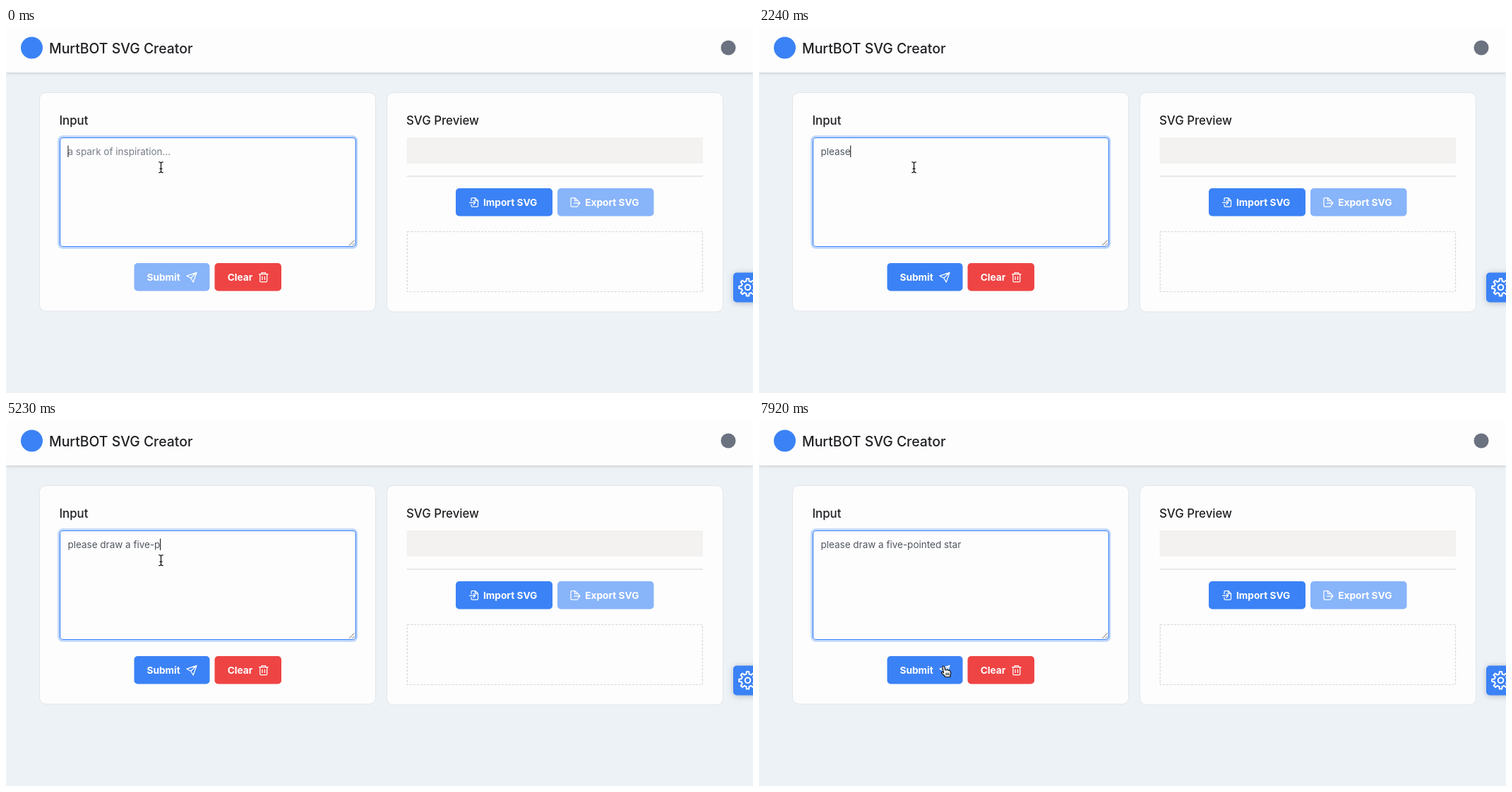
These frames come from a looping animation (1058x517 px, 8 s). An HTML page:

```html
<!DOCTYPE html>
<html lang="en">
<head>
<meta charset="utf-8">
<title>SVG Creator</title>
<style>
  html, body { margin: 0; width: 100%; height: 100%; overflow: hidden; background: #edf2f6; }
  svg { display: block; }
  text { font-family: Inter, sans-serif; font-size: 13.5px; white-space: pre; fill: #1f2124; }
  .title { font-size: 19.4px; font-weight: 500; }
  .heading { font-size: 16.8px; font-weight: 500; }
  .label { font-size: 13.7px; font-weight: 700; fill: #fff; }
  .card { fill: #fdfdfd; stroke: #e2e6eb; }
  .icon { fill: none; stroke: #fff; stroke-width: 1.25; stroke-linecap: round; stroke-linejoin: round; }
  .blue { fill: #3b82f6; }
  .pale { fill: #88b4fa; }
  .red { fill: #ef4444; }
  .bar { filter: drop-shadow(0 1px 2px rgba(0, 0, 0, .18)); }
  .tab { filter: drop-shadow(0 1px 4px rgba(40, 60, 90, .3)); }
</style>
</head>
<body>
<svg width="1058" height="517" viewBox="0 0 1058 517">
  <defs>
    <g id="file" class="icon">
      <path d="M2.5 5V2Q2.5 .7 3.8 .7H8L12 4.7V12Q12 13.3 10.7 13.3H3.8Q2.5 13.3 2.5 12V10M8 .7V4.7H12"/>
    </g>
  </defs>

  <rect class="bar" width="1058" height="63" fill="#fdfdfd"/>
  <circle class="blue" cx="36.5" cy="28" r="15.5"/>
  <text class="title" x="61" y="35.7">MurtBOT SVG Creator</text>
  <circle cx="1023" cy="28" r="10.5" fill="#6b7280"/>

  <rect class="card" x="47.5" y="91.5" width="476" height="309.5" rx="9"/>
  <text class="heading" x="75.5" y="137">Input</text>
  <rect x="74.7" y="153.7" width="422" height="157.6" rx="5.5" fill="none" stroke="#bfd7fc" stroke-width="3"/>
  <rect x="76.5" y="155.5" width="418.8" height="154" rx="4.5" fill="#fdfdfd" stroke="#3b82f6" stroke-width="1.2"/>
  <path d="M486 308L493.5 300.5M490.5 308L493.5 305" stroke="#777" fill="none"/>
  <text id="typed" x="87.4" y="179.8"></text>
  <rect id="caret" y="166.5" width="1.1" height="16.5" fill="#222"/>

  <rect id="submit" x="181.5" y="333" width="107" height="39.5" rx="5"/>
  <text class="label" x="199.5" y="358">Submit</text>
  <path class="icon" d="M270 346.3L256 351.2L261.8 354.3L265.2 360ZL261.8 354.3"/>
  <rect class="red" x="295.5" y="333" width="94.5" height="39.5" rx="5"/>
  <text class="label" x="313.7" y="358">Clear</text>
  <path class="icon" d="M358.5 348.5H371M362 348.5V346.5H367.5V348.5M359.8 348.5V358.5Q359.8 359.7 361 359.7H368.5Q369.7 359.7 369.7 358.5V348.5M363 352V356.5M366.5 352V356.5"/>

  <rect class="card" x="539.5" y="91.5" width="476" height="310.5" rx="9"/>
  <text class="heading" x="567" y="137">SVG Preview</text>
  <rect x="567.5" y="155" width="419.5" height="37" fill="#f3f2f1"/>
  <rect x="567.5" y="209" width="419.5" height="1.8" fill="#e6e7e9"/>
  <rect class="blue" x="637" y="227" width="137" height="39.5" rx="5"/>
  <use href="#file" x="656.5" y="239.8"/>
  <path class="icon" d="M656.5 247.3H664.5M662 244.6L664.7 247.3L662 250"/>
  <text class="label" x="676" y="252">Import SVG</text>
  <rect class="pale" x="781" y="227" width="136.5" height="39.5" rx="5"/>
  <path class="icon" d="M810 244.5L805.5 240.5H801.3Q800 240.5 800 241.8V251.8Q800 253.1 801.3 253.1H808.7Q810 253.1 810 251.8M805.5 240.5V244.5H810M804.5 248H813M810.6 245.5L813 248L810.6 250.5"/>
  <text class="label" x="820.2" y="252">Export SVG</text>
  <rect x="568.2" y="288.5" width="418.3" height="85" fill="none" stroke="#d5d6d8" stroke-width="1.2" stroke-dasharray="3 2"/>

  <rect class="blue tab" x="1030" y="346.5" width="40" height="42" rx="5"/>
  <path id="gear" class="icon" style="stroke-width:2"/>
  <circle class="icon" cx="1050.5" cy="367.3" r="3.8" style="stroke-width:2"/>

  <g id="beam" fill="none" stroke-linecap="round">
    <path d="M-2.8 -7.5Q0 -7.5 0 -5.5Q0 -7.5 2.8 -7.5M0 -5.5V5.5M-2.8 7.5Q0 7.5 0 5.5Q0 7.5 2.8 7.5M-1.5 2H1.5" stroke="#fff" stroke-width="2.8"/>
    <path d="M-2.8 -7.5Q0 -7.5 0 -5.5Q0 -7.5 2.8 -7.5M0 -5.5V5.5M-2.8 7.5Q0 7.5 0 5.5Q0 7.5 2.8 7.5M-1.5 2H1.5" stroke="#111" stroke-width="1.3"/>
  </g>
  <g id="hand" transform="translate(257 346)" stroke-linejoin="round" stroke-linecap="round">
    <path d="M4.5 10.5L3 2.8Q2.8 1.2 4 1Q5.2 .9 5.6 2.4L6.8 7Q7.5 5.6 9 6.8Q10.3 5.8 11.4 7.3Q13.2 6.6 13.8 8.5Q15.5 12 13.8 14V16.5H6.8Q5.5 14 2.3 11.8Q.8 10.2 2 9.4Q3 9 4.5 10.5Z" fill="#fff" stroke="#111" stroke-width="1.2"/>
    <path d="M8 11V14M10 11V14M12 11V14" stroke="#111" fill="none"/>
  </g>
</svg>
<script>
const LOOP = 8000;
const MESSAGE = "please draw a five-pointed star";
const PLACEHOLDER = "a spark of inspiration...";

// Each burst: start, interval, and the message length after every step.
const bursts = [
  [1640, 150, [1, 2, 3, 4, 6]],
  [2540, 150, [7]],
  [2840, 150, [8, 9, 10, 11, 12, 13]],
  [4040, 148, [14, 15, 16, 17, 18, 19]],
  [5230, 150, [20, 21, 22, 24, 25]],
  [6130, 300, [26, 27]],
  [6730, 150, [28, 29, 30, 31]],
];
const keys = bursts.flatMap(([start, gap, lengths]) =>
  lengths.map((length, i) => ({ time: start + i * gap, length })));

const byId = id => document.getElementById(id);
const typed = byId("typed"), caret = byId("caret"), submit = byId("submit");
const beam = byId("beam"), hand = byId("hand");

function gearPath(cx, cy, teeth) {
  const points = [];
  for (let i = 0; i < teeth; i++) {
    for (const [offset, radius] of [[-.3, 9], [-.17, 12.4], [.17, 12.4], [.3, 9]]) {
      const angle = (i + offset) / teeth * 2 * Math.PI;
      points.push(`${cx + radius * Math.cos(angle)} ${cy + radius * Math.sin(angle)}`);
    }
  }
  return `M${points.join("L")}Z`;
}
byId("gear").setAttribute("d", gearPath(1050.5, 367.3, 8));

const show = (element, visible) =>
  element.setAttribute("visibility", visible ? "visible" : "hidden");

function draw(t) {
  const length = keys.findLast(key => key.time <= t)?.length ?? 0;
  const text = MESSAGE.slice(0, length);

  typed.textContent = text;
  caret.setAttribute("x", 87.4 + (length ? typed.getComputedTextLength() - .4 : 0));
  if (!length) typed.textContent = PLACEHOLDER;
  typed.style.fill = length ? "#50565f" : "#777d86";
  submit.setAttribute("class", length ? "blue" : "pale");

  const blinkedOff = (t >= 150 && t < 600) || (t >= 1200 && t < 1640) || t >= 7620;
  show(caret, !blinkedOff);

  beam.setAttribute("transform", t < 7770 ? "translate(219.5 197.3)" : "translate(238 262)");
  show(beam, t < 7920);
  show(hand, t >= 7920);
}

const start = performance.now();
function tick() {
  draw((performance.now() - start) % LOOP);
  requestAnimationFrame(tick);
}
tick();
</script>
</body>
</html>
```
